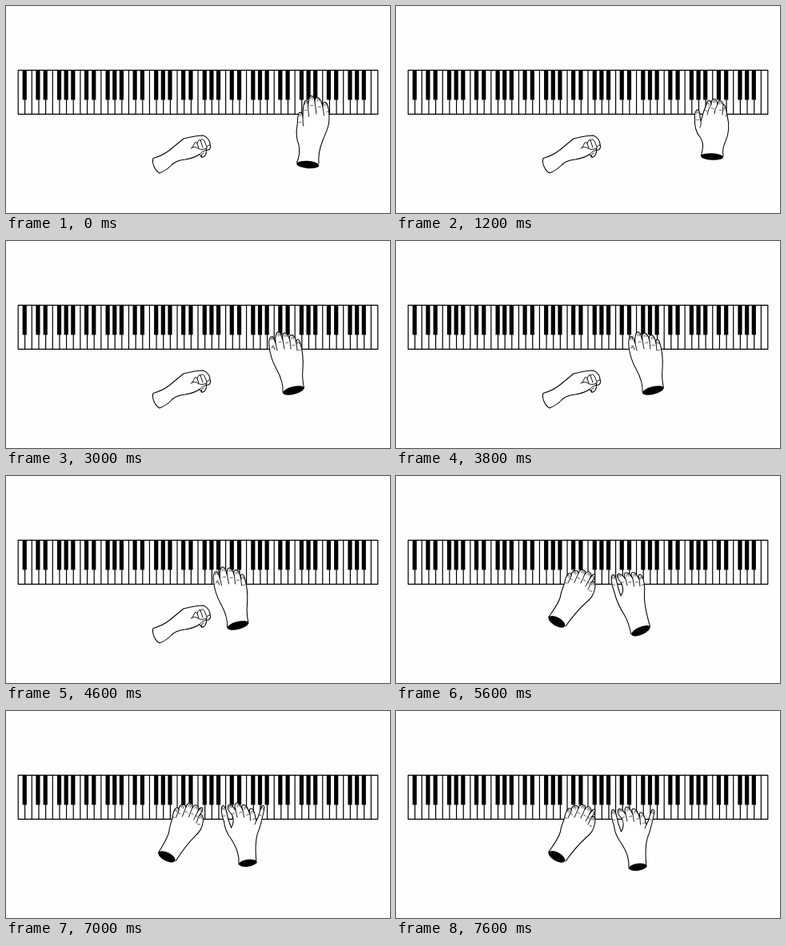
Animation, 480 px wide and 259 px high, one loop 7.8 s. Source, as an HTML page:

```html
<!DOCTYPE html>
<html>
<head>
<meta charset="utf-8">
<title>Piano hands</title>
<style>
  html, body { margin: 0; width: 100%; height: 100%; overflow: hidden; background: #fefefe; }
  svg { display: block; width: 480px; height: 259px; }
  path { stroke: #000; stroke-linejoin: round; stroke-linecap: round; }
</style>
</head>
<body>
<svg id="stage" viewBox="0 0 480 259"></svg>
<script>
const stage = document.getElementById('stage');
const STEP = 200, LOOP = 7800;

// Each hand: outline, creases, fingertips [x, y, tilt], wrist [x, y, rx, ry, tilt]
const hands = {
  reach: {
    line: 'M363.5 196C367 188 367.500 181 366 174C363 166 362.500 157 364 149C365 142 364 136 366.500 133.500C369 132 371 135 371 139C371 131 372 122 374 118.500C377 117 378 121 377.500 126C378 121 378 114 381 112.500C384 112 386 115 386 120C386 116 387 114.500 390 114.500C394 116 394 121 396 126C396 120 399 118 401.500 123C404 130 404.500 139 403.500 147C402 155 399 160 396 168C392 178 390 188 391 197',
    crease: 'M371 139L371.500 150M377.500 126L378.500 138M386 120L388 135M396 126L397.500 137',
    tips: [[367.500, 135, 0], [374.800, 120, 0], [382, 114, 0], [390, 116, -10], [399.500, 122, -15]],
    wrist: [377.300, 198.500, 14, 4.700, 4]
  },
  curl: {
    line: 'M381.500 187C384 178 385 171 380 164C374 157 373 148 373.500 140C373 134 375 129 378 130C381 132 379 139 381 144C383 139 384 132 387 126C388 120 390 117 393 119L394 123C394 116 398 114 401 119L402 123C403 117 407 117 409 123C413 124 412 130 414 137C417 149 416 160 412 169C408 177 408 182 409 188',
    crease: 'M381 144Q382 149 380 152M394 123Q390 129 389 136M402 123Q398 129 398 135M409 123L408 136',
    tips: [[377, 132, 0], [390.500, 121, 18], [398, 118, 12], [405.500, 120, 0], [411, 127, -10]],
    wrist: [395, 188.500, 14, 4.200, 3]
  },
  slide: {
    line: 'M346 189C347 178 343 169 338 160C333 151 330 142 329 132C328 123 330 119 333 119.500C336 121 335 125 337 128C336 119 338 113 341 114C345 115 344 120 346 124C345 117 347 114 350 115.500C353 117 354 121 355 125C353 119 356 116 359 118.500C362 120 362 125 363 128C362 123 365 122 367 125C370 134 372 147 371 160C370 170 371 177 372.500 184',
    crease: 'M337 128L339 137M346 124L348 135M355 125L356 135M363 128L364 137M332 134Q335 130 336 136',
    tips: [[332, 121, -10], [341, 116, -8], [349.500, 117, -10], [358, 120, -8], [365, 126, -8]],
    wrist: [359.300, 187, 13.500, 4.900, -14]
  },
  close: {
    line: 'M294 198C292 189 290 181 285 173C279 164 275 154 272.500 144C269 135 268 125 271 123.500C275 123 276 134 278 141L281 150C285 145 284 138 281 133C277 129 275 124 278 122.500C282 122 284 126 287 129C284 123 285 120.500 289 121C292 122 294 126 296 128C292 122 295 119.500 298 121C301 123 302 126 304 129C302 123 304 122 307 124.500C311 130 311 140 310.500 149C310 162 314 176 317.500 188',
    crease: 'M287 129L289 137M296 128L297.500 138M304 129L305 138',
    tips: [[271, 126, -8], [278.500, 124, -25], [288.500, 123, -20], [297.500, 123, -18], [306, 126, -14]],
    wrist: [306, 193.700, 12.500, 5, -24]
  },
  wide: {
    line: 'M291 197C292 185 288 176 282 166C276 158 273 151 272.500 143C269 135 268 125 271 123.500C275 123 276 134 278 141L281.500 151C285 146 285 138 282 134C277 130 276 124 279 122.500C283 122 284 126 287 129C285 123 286 119.500 290 120C293 122 294 126 296 129C293 122 297 121 300 124C303 126 303 131 305 134C303 127 306 125 309 129C312 133 311 138 313 142C316 138 317 130 319.500 124.500C321 122 323.500 124 323 127C321 136 319 145 316.500 153C311 164 311.500 180 313 195',
    crease: 'M287 129L289 138M296 129L297.500 138M305 134L305.500 142M313 142L311 147',
    tips: [[271, 126, -8], [279.500, 124, -25], [289.500, 122, -20], [299, 125, -18], [307.500, 130, -14], [321, 125.500, 18]],
    wrist: [302.200, 195.300, 11.300, 4.500, -8]
  },
  left: {
    line: 'M190.500 177C196 169 203 160 205.500 151C206 146 208 141 210 136C211 131 212 126 214.500 123C217 121 219 121 219 125C219 119 223 117.500 227 119L228 122C229 117 233 116 236.500 119L236 123C239 118 243 119 244 124L242 129C245 122 249 122 249 125C249 128 246 131 244 133C248 130 250 135 248.500 141C247 149 244 153 238 158C227 168 219 178 212 188',
    crease: 'M219 125L215 134M228 122L223 133M236 123L231 134M242 129L237 138M244 133L240 142',
    tips: [[216, 124, 22], [224.500, 120, 28], [234, 119, 32], [241.500, 122, 32], [247, 125, 36], [246.500, 134, 18]],
    wrist: [201, 182.300, 11.500, 5.400, 30]
  },
  fist: {
    line: 'M192 209C186 206 182 196 184 190.500C193 188 200 184 205 180C211 175 217 170 222 166C230 164 239 162 246.500 162C252 164 255 169 255 173C256.500 177 255 181 250.500 180C251 185 248 190 244.500 189L242 185.500C236 190 230 191 224 192C215 193 209 196 206 200C202 204 197 207 192 209Z',
    crease: 'M231 178Q236 175 240 178T251 178M233 177L236 171Q238 169 239 172L241 178M239 172Q241 166 243 168L246 177M243 168Q246 165 248 169L251 176M242 185.500Q244 182 250.500 180M250.500 180Q250 174 255 174M244.500 189Q244 184 247 184',
  }
};

// [step, hand, x, y]; positions glide while the hand shape stays the same
const keys = [
  [0, 'reach', 0, 0], [2, 'reach', 5, -11],
  [3, 'curl', -9, -8], [6, 'curl', 0, 0], [9, 'curl', -8, -11], [11, 'curl', -20, -2],
  [12, 'wide', 84, -8],
  [13, 'slide', 24, 0], [15, 'slide', 0, 0], [17, 'slide', -22, 0],
  [18, 'wide', 31, -8],
  [19, 'slide', -38, 0], [23, 'slide', -69.500, 0],
  [24, 'close', 0, 0], [31, 'wide', 0, 0]
];

function piano() {
  const pitch = 450 / 52;
  let whites = '', blacks = '';
  for (let i = 1; i < 52; i++) {
    const x = 15 + i * pitch;
    whites += `M${x} 80.400V135.300`;
    // The lowest key is an A
    const note = (i + 5) % 7;
    if (note !== 0 && note !== 3) {
      const shift = note === 1 ? -1 : -.4;
      blacks += `<rect x="${x - 2.6 + shift}" y="80.400" width="5.200" height="37"/>`;
    }
  }
  return `<path d="M15.200 80.400H464.800V135.300H15.200Z" fill="#fff" stroke-width="1.200"/>
    <path d="${whites}" stroke-width="1.200"/>${blacks}`;
}

function fingertip([x, y, tilt]) {
  return `<path transform="translate(${x} ${y}) rotate(${tilt})" fill="none" stroke-width=".6"
    d="M-1.200 2.800V.800Q0 -.800 1.200 .800V2.800M-1.500 10.500Q0 9.800 1.500 10.500"/>`;
}

function drawHand({ line, crease, tips = [], wrist }) {
  const g = document.createElementNS('http://www.w3.org/2000/svg', 'g');
  let art = `<path d="${line}" fill="#fff" stroke-width="1.050"/>
    <path d="${crease}" fill="none" stroke-width=".9"/>` + tips.map(fingertip).join('');
  if (wrist) {
    const [x, y, rx, ry, tilt] = wrist;
    art += `<ellipse rx="${rx}" ry="${ry}" transform="translate(${x} ${y}) rotate(${tilt})"/>`;
  }
  g.innerHTML = art;
  stage.append(g);
  return g;
}

stage.innerHTML = piano();
const groups = {};
for (const name in hands) groups[name] = drawHand(hands[name]);

function show(name, transform) {
  groups[name].style.display = '';
  groups[name].setAttribute('transform', transform);
}

function pose(step) {
  for (const name in groups) groups[name].style.display = 'none';
  const i = keys.findLastIndex(k => k[0] <= step);
  const [start, name, x, y] = keys[i];
  const next = keys[i + 1];
  const glide = next && next[1] === name;
  const p = glide ? (step - start) / (next[0] - start) : 0;
  const mix = (a, b) => a + (b - a) * p;
  const duet = step >= 24;
  const lift = duet && step % 2 ? 1 : 0;

  if (duet) show('left', `rotate(${lift * -3} 201 182)`);
  else show('fist', '');
  show(name, `translate(${glide ? mix(x, next[2]) : x} ${(glide ? mix(y, next[3]) : y) - lift * 5})`);
}

const begin = performance.now();
function tick() {
  pose(Math.floor((performance.now() - begin) % LOOP / STEP));
  requestAnimationFrame(tick);
}
tick();
</script>
</body>
</html>
```
